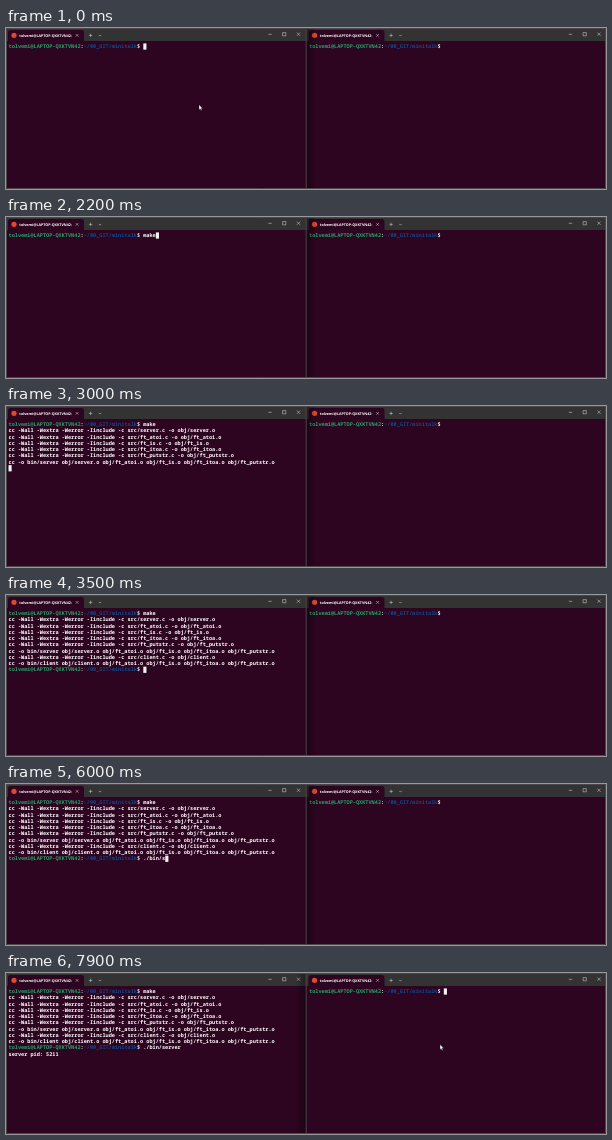
These frames come from a looping animation (600x161 px, 8000 ms). An HTML page:

```html
<!DOCTYPE html>
<html lang="en">
<head>
<meta charset="utf-8">
<title>Terminals</title>
<style>
  html, body { margin: 0; width: 100%; height: 100%; overflow: hidden; background: #2d0520; }
  svg { display: block; width: 600px; height: 161px; }
  text { white-space: pre; text-rendering: geometricPrecision; }
  .term { font: 600 5.225px "Noto Sans Mono", "DejaVu Sans Mono", monospace; fill: #fff; }
  .user { fill: #26a269; font-weight: 700; }
  .path { fill: #12488b; font-weight: 700; }
  .tab { font: 700 3.65px "Open Sans", sans-serif; fill: #fff; }
  .icon { fill: none; stroke: #ddd; stroke-width: .5; }
  .edge { fill: none; stroke: #4a4649; }
</style>
</head>
<body>
<svg id="stage" viewBox="0 0 600 161">
  <defs>
    <linearGradient id="fade">
      <stop offset="0" stop-color="#000" stop-opacity=".35"/>
      <stop offset="1" stop-color="#000" stop-opacity="0"/>
    </linearGradient>
    <clipPath id="label"><rect x="13" y="2" width="53" height="11"/></clipPath>
  </defs>
</svg>
<script>
const LOOP = 8000, BLINK = 530, FOCUS = 7700;
const LEFT = 2.5, TOP = 15.4, CELL = 3.135, PITCH = 6.25, RIGHT_X = 300.5;
const USER = 'tolvemi@LAPTOP-QXKTVN42', DIR = '~/00_GIT/minitalk';
const PROMPT_COLS = USER.length + DIR.length + 3;

const stage = document.getElementById('stage');

function add(parent, tag, attrs = {}, text = '') {
  const el = document.createElementNS('http://www.w3.org/2000/svg', tag);
  for (const k in attrs) el.setAttribute(k, attrs[k]);
  el.textContent = text;
  return parent.appendChild(el);
}

function addWindow(x) {
  const g = add(stage, 'g', { transform: `translate(${x} 0)` });
  add(g, 'rect', { width: 300, height: 161, fill: '#2d0520' });
  add(g, 'rect', { width: 300, height: 13, fill: '#333' });
  add(g, 'path', { d: 'M2 13V4.5Q2 2 4.5 2H75.5Q78 2 78 4.5V13Z', fill: '#2d0520' });
  add(g, 'circle', { cx: 8, cy: 7.3, r: 2.6, fill: '#de4a30' });
  add(g, 'text', { class: 'tab', x: 13.3, y: 8.8, 'clip-path': 'url(#label)' }, USER + ':');
  add(g, 'path', {
    class: 'icon',
    d: 'M69.8 6.1l2.6 2.6m0-2.6l-2.6 2.6M82.9 7.4h3.4m-1.7-1.7v3.4M92.8 6.9l1.2 1.2 1.2-1.2' +
       'M262.3 6.3h3.4M276.6 4.6h3.2v3.2h-3.2zM290.9 4.6l3.2 3.2m0-3.2l-3.2 3.2'
  });
  return g;
}

function addRow(g, row, text, prompt) {
  const el = add(g, 'text', { class: 'term', x: LEFT, y: TOP + row * PITCH + 4.8 });
  if (prompt) {
    add(el, 'tspan', { class: 'user' }, USER);
    add(el, 'tspan', {}, ':');
    add(el, 'tspan', { class: 'path' }, DIR);
    add(el, 'tspan', {}, '$ ');
  }
  return { el, body: add(el, 'tspan', {}, text) };
}

const addCursor = g => add(g, 'rect', { width: CELL, height: PITCH, fill: '#f2f2f2' });

function placeCursor(el, row, col, visible) {
  el.setAttribute('x', LEFT + col * CELL);
  el.setAttribute('y', TOP + row * PITCH);
  el.style.opacity = visible ? 1 : 0;
}

const compile = name => `cc -Wall -Wextra -Werror -Iinclude -c src/${name}.c -o obj/${name}.o`;
const link = name =>
  `cc -o bin/${name} ` + [name, 'ft_atoi', 'ft_is', 'ft_itoa', 'ft_putstr'].map(n => `obj/${n}.o`).join(' ');

// Each row appears at `at`; prompts are typed at `keys` and end with Enter.
const script = [
  { at: 0, prompt: true, text: 'make', keys: [1800, 1900, 2000, 2100], enter: 2550 },
  { at: 2590, text: compile('server') },
  { at: 2690, text: compile('ft_atoi') },
  { at: 2780, text: compile('ft_is') },
  { at: 2850, text: compile('ft_itoa') },
  { at: 2900, text: compile('ft_putstr') },
  { at: 2980, text: link('server') },
  { at: 3090, text: compile('client') },
  { at: 3190, text: link('client') },
  { at: 3290, prompt: true, text: './bin/server', enter: 6600,
    keys: [4390, 5190, 5390, 5490, 5590, 5740, 5890, 6090, 6190, 6290, 6390, 6490] },
  { at: 6650, text: 'server pid: 5211' }
];

const left = addWindow(0), right = addWindow(RIGHT_X);
const rows = script.map((s, i) => addRow(left, i, s.text, s.prompt));
addRow(right, 0, '', true);
const leftCursor = addCursor(left), rightCursor = addCursor(right);

const shadow = add(stage, 'rect', { width: 10, height: 161, fill: 'url(#fade)' });
add(stage, 'path', { class: 'edge', d: 'M.5 .5H599.5V160.5H.5ZM300.2 0V161' });
const mouse = add(stage, 'path', {
  d: 'M0 0V5.2L1.2 4.1 2 5.9 2.9 5.5 2.1 3.8H3.7Z',
  fill: '#fff', stroke: '#111', 'stroke-width': .35
});

function drawMouse(t) {
  const p = Math.min(1, Math.max(0, (t - 7100) / 500));
  const e = p * p * (3 - 2 * p);
  mouse.setAttribute('transform', `translate(${193 + 241 * e} ${76.7 - 5.2 * e})`);
  mouse.style.opacity = t < 1800 || t >= 7100 ? 1 : 0;
}

function draw(t) {
  let row = 0, col = 0, last = 100;
  script.forEach((s, i) => {
    const shown = t >= s.at;
    rows[i].el.style.opacity = shown ? 1 : 0;
    if (!shown) return;
    last = Math.max(last, s.at);
    row = i + 1;
    col = 0;
    if (!s.prompt) return;
    const typed = s.keys.filter(k => k <= t);
    rows[i].body.textContent = s.text.slice(0, typed.length);
    last = Math.max(last, ...typed);
    if (t >= s.enter) {
      last = s.enter;
    } else {
      row = i;
      col = PROMPT_COLS + typed.length;
    }
  });

  const lit = Math.floor(Math.max(0, t - last) / BLINK) % 2 === 0;
  const onRight = t >= FOCUS;
  placeCursor(leftCursor, row, col, lit && !onRight);
  placeCursor(rightCursor, 0, PROMPT_COLS, onRight);
  shadow.setAttribute('transform', onRight ? 'translate(299.6 0) scale(-1 1)' : 'translate(300.6 0)');
  drawMouse(t);
}

const start = performance.now();
function tick() {
  draw((performance.now() - start) % LOOP);
  requestAnimationFrame(tick);
}
tick();
</script>
</body>
</html>
```
